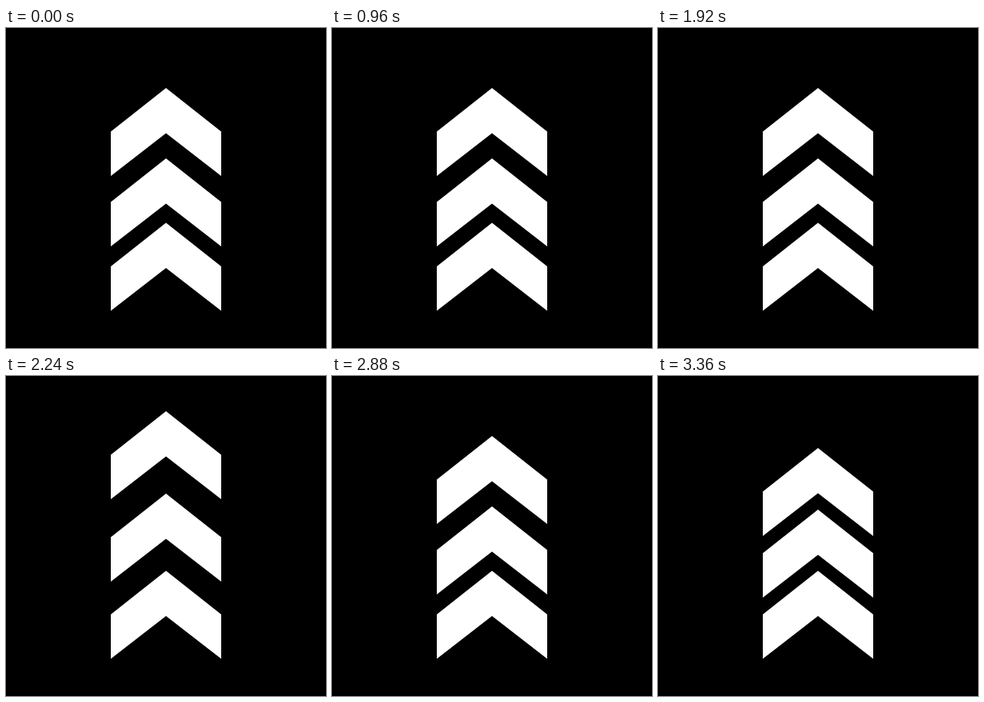
These frames come from a looping animation (400 by 400 pixels, 3840 ms). An HTML page:

```html
<!DOCTYPE html>
<html lang="en">
<head>
<meta charset="utf-8">
<title>Rising chevrons</title>
<style>
  html, body { margin: 0; height: 100%; overflow: hidden; background: #000; }
  svg { display: block; width: 100vw; height: 100vh; fill: #fff; }
</style>
</head>
<body>
<svg viewBox="0 0 400 400">
  <defs><path id="chevron" d="M200 0 269 54.5V110L200 56.5 131 110V54.5Z"/></defs>
  <use href="#chevron"/>
  <use href="#chevron"/>
  <use href="#chevron"/>
</svg>
<script>
const CYCLE = 960, STEP = 40, PEAK = 320, END = 480;
const REST = [90, 167, 243.5];
const chevrons = document.querySelectorAll('use');

// Quick start, slow approach to the peak, then a faster return.
function lift(t, height, power) {
  if (t >= END) return 0;
  if (t <= PEAK) return height * (1 - (1 - (t + STEP) / (PEAK + STEP)) ** power);
  return height * (1 + Math.cos(Math.PI * (t - PEAK) / (END - PEAK))) / 2;
}

// The lowest chevron only gets a small nudge on the way up.
const nudge = t => t < PEAK ? 3 * Math.sin(Math.PI * t / PEAK) : 0;

function draw(now) {
  const t = Math.floor(now % CYCLE / STEP) * STEP;
  const lifts = [lift(t, 46, 3.35), lift(t, 20, 1.9), nudge(t)];
  chevrons.forEach((c, i) => c.setAttribute('y', Math.round((REST[i] - lifts[i]) * 2) / 2));
}

function loop() {
  draw(performance.now());
  requestAnimationFrame(loop);
}
loop();
</script>
</body>
</html>
```
